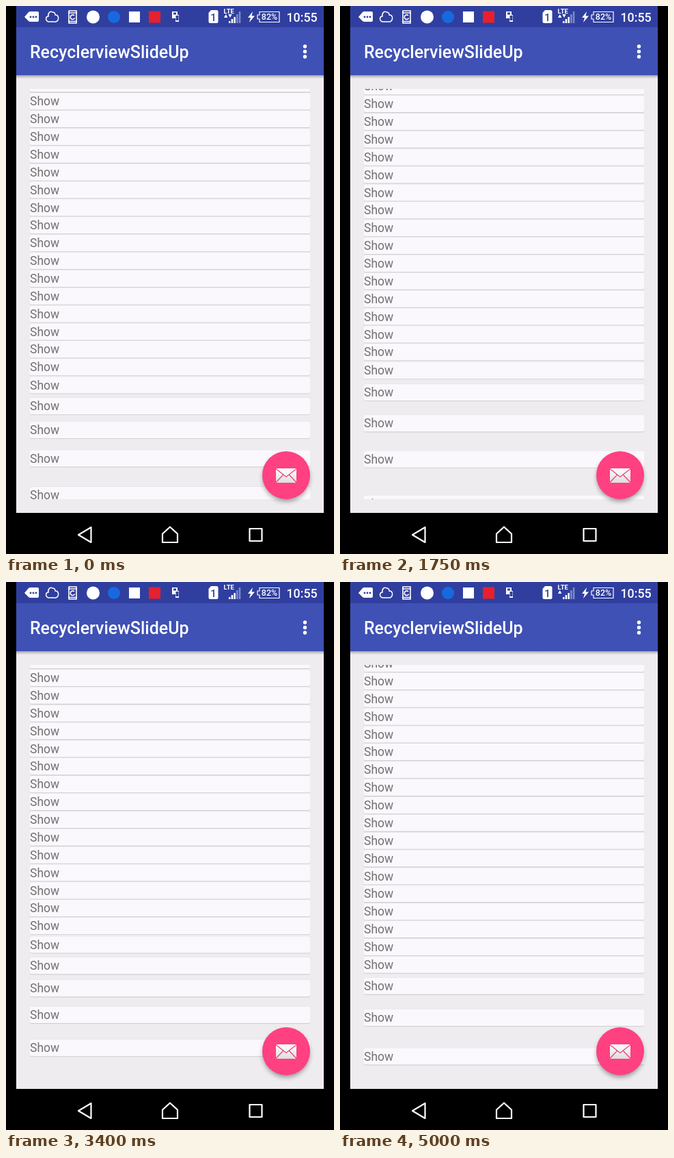
Animation of 480 by 800 pixels, one loop 5050 ms. Source, as an HTML page:

```html
<!DOCTYPE html>
<html lang="en">
<head>
<meta charset="utf-8">
<title>Slide-up list</title>
<style>
  html, body { margin: 0; width: 100%; height: 100%; overflow: hidden; background: #000; }
  svg { display: block; width: 480px; height: 800px; font-family: Roboto, sans-serif; }
</style>
</head>
<body>
<svg viewBox="0 0 480 800">
  <defs>
    <clipPath id="viewport"><rect x="35" y="121" width="410" height="599"/></clipPath>
    <clipPath id="screen"><rect x="15" y="0" width="450" height="740"/></clipPath>
    <linearGradient id="barShadow" x2="0" y2="1">
      <stop stop-color="#000" stop-opacity=".3"/>
      <stop offset="1" stop-color="#000" stop-opacity="0"/>
    </linearGradient>
    <linearGradient id="paper" x2="0" y2="1">
      <stop stop-color="#fff"/>
      <stop offset="1" stop-color="#dedede"/>
    </linearGradient>
    <filter id="blur" x="-50%" y="-50%" width="200%" height="200%"><feGaussianBlur stdDeviation="3.5"/></filter>
    <g id="card">
      <rect x="34.6" y="-12.4" width="410.8" height="25.7" rx="3" opacity=".07"/>
      <rect x="35" y="-11" width="410" height="24" rx="3" opacity=".07"/>
      <rect x="35" y="-12.1" width="410" height="24.3" rx="2.5" fill="#faf8fc"/>
      <text x="35" y="6.3" font-size="17.5" fill="#727173">Show</text>
    </g>
  </defs>

  <rect width="480" height="800"/>
  <rect x="15" width="450" height="740" fill="#eeecef"/>
  <g id="list" clip-path="url(#viewport)"></g>

  <!-- app bar -->
  <rect x="15" y="101" width="450" height="5" fill="url(#barShadow)"/>
  <rect x="15" y="31" width="450" height="70" fill="#3f51b5"/>
  <rect x="15" width="450" height="31" fill="#303f9f"/>
  <text x="35" y="76" font-size="25" font-weight="500" fill="#fff">RecyclerviewSlideUp</text>
  <g fill="#fff">
    <circle cx="437.5" cy="59" r="2.7"/><circle cx="437.5" cy="66.5" r="2.7"/><circle cx="437.5" cy="74" r="2.7"/>
  </g>

  <!-- status bar -->
  <g fill="#fff">
    <path d="M27 16l6-7q1-1 3-1h10q2 0 2 2v11q0 2-2 2H36q-2 0-3-1z"/>
    <g fill="#303f9f"><circle cx="36" cy="16" r="1.4"/><circle cx="40" cy="16" r="1.4"/><circle cx="44" cy="16" r="1.4"/></g>
    <path d="M62 23c-5-2-4-8 0-8c-1-5 3-8 6-6c3 0 4 2 4 4c6 0 6 8 1 10z" fill="none" stroke="#fff" stroke-width="1.5"/>
    <path d="M92 7h11v18H92zM91 10h13M91 22.5h13M100 14a3.3 3.3 0 1 0 .6 3.5" fill="none" stroke="#fff" stroke-width="1.6"/>
    <circle cx="127.5" cy="16" r="9.5"/>
    <circle cx="158" cy="16" r="9" fill="#1769e0"/>
    <rect x="180" y="8" width="16" height="16"/>
    <rect x="209" y="7.5" width="17" height="17" fill="#e8202c"/>
    <path d="M243 8h8v10h-8zM248 13h5v10h-5z"/>
    <path d="M248.5 14h4v7h-4zM245 9.5h4v3h-4z" fill="#303f9f"/>
    <path d="M300 6h8q2.500 0 2.500 2.500v14q0 2.500-2.500 2.500h-9q-2.500 0-2.500-2.500V10z"/>
    <text x="303.500" y="22" font-size="15" font-weight="500" text-anchor="middle" fill="#303f9f">1</text>
    <text x="318.500" y="11" font-size="9.500" font-weight="700">LTE</text>
    <path id="upArrow" d="M319 17l2.700-5 2.700 5z"/>
    <path id="downArrow" d="M325.300 12h5.400l-2.700 5z"/>
    <path d="M326 22h2.500v3H326zM329.700 19h2.500v6h-2.500zM333.400 16h2.500v9h-2.500z"/>
    <path d="M337.100 12h2.500v13h-2.500zM340.800 8h2.500v17h-2.500z" opacity=".4"/>
    <path d="M361 8l-7 9h4l-2 7 8-9.500h-4.500z"/>
    <path d="M371 8.500h29v15h-29v-4.500h-3v-6h3z" fill="none" stroke="#fff" stroke-width="1.200"/>
    <text x="385.500" y="20.300" font-size="12.500" font-weight="500" text-anchor="middle">82%</text>
    <text x="410.500" y="22.500" font-size="17.800" font-weight="500">10:55</text>
  </g>

  <!-- floating button -->
  <g clip-path="url(#screen)">
    <circle cx="410" cy="689" r="34" opacity=".38" filter="url(#blur)"/>
    <circle cx="410" cy="685" r="35" fill="#ff4081"/>
    <rect x="395" y="675" width="30" height="21" rx="1" fill="url(#paper)"/>
    <path d="M395 675.500l15 12 15-12M395 695.500l10.500-11M425 695.500l-10.500-11" fill="none" stroke="#e6457c" stroke-width="1.300"/>
  </g>

  <!-- navigation bar -->
  <g fill="none" stroke="#fff" stroke-width="2.200" stroke-linejoin="round">
    <path d="M124.500 761v22l-18.500-11z"/>
    <path d="M229 770.500l11-10 11 10v12.500h-22z"/>
    <rect x="356.500" y="763" width="18" height="18"/>
  </g>
</svg>

<script>
const LOOP = 5050, STEP = 50;
const PITCH = 25.87, FIRST_Y = 139, ROWS = 23;
const SLIDE_MS = 770, SLIDE_FROM = 598;

// Successive flings: time in ms, rows scrolled.
const flings = [
  [-1300, -14], [-751, -7], [-698, -6], [-652, -5], [-598, -4], [-531, -3], [0, 0],
  [88, 2], [456, 10], [800, 18.17],
  [1012, 23], [1063, 24], [1142, 25], [1209, 26], [1282, 27], [1750, 30.85],
  [1921, 33], [1981, 34], [2055, 35], [2650, 36.99],
  [2668, 37], [2710, 38], [2746, 39], [2792, 40], [2850, 41], [3400, 44.97],
  [3545, 47], [3593, 48], [3630, 49], [3676, 50], [3728, 51], [3782, 52], [3846, 53], [4300, 56.98],
  [4389, 58], [4466, 59], [5000, 62.78], [5100, 63.4]
];

// Piecewise linear lookup, usable in both directions.
function lookup(value, from, to) {
  let i = 1;
  while (i < flings.length - 1 && flings[i][from] < value) i++;
  const a = flings[i - 1], b = flings[i];
  return a[to] + (value - a[from]) / (b[from] - a[from]) * (b[to] - a[to]);
}
const scrollAt = time => lookup(time, 0, 1);
const entryTime = row => lookup(row - ROWS, 1, 0);

const byId = id => document.getElementById(id);
const cards = Array.from({ length: ROWS + 2 }, () => {
  const card = document.createElementNS('http://www.w3.org/2000/svg', 'use');
  card.setAttribute('href', '#card');
  return byId('list').appendChild(card);
});
const show = (id, on) => byId(id).setAttribute('visibility', on ? 'visible' : 'hidden');

function draw(time) {
  const scroll = scrollAt(time);
  const top = Math.floor(scroll) - 1;
  cards.forEach((card, i) => {
    const row = top + i;
    const left = Math.min(1, Math.max(0, 1 - (time - entryTime(row)) / SLIDE_MS));
    const y = FIRST_Y + PITCH * (row - scroll) + SLIDE_FROM * left * left;
    card.setAttribute('transform', `translate(0 ${y.toFixed(2)})`);
  });
  const idle = time >= 3100 && time < 3600;
  show('upArrow', !idle);
  show('downArrow', !idle && time < 4700);
}

function tick() {
  draw(Math.floor(performance.now() % LOOP / STEP) * STEP);
  requestAnimationFrame(tick);
}
tick();
</script>
</body>
</html>
```
